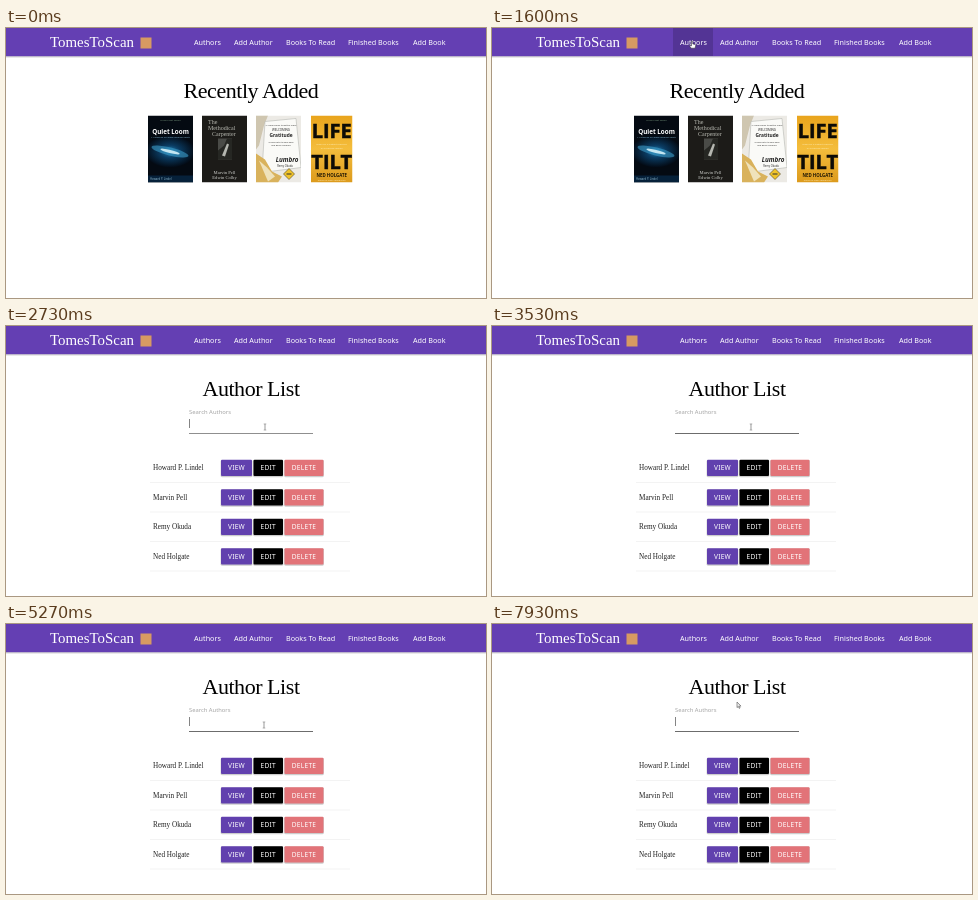
An HTML page that plays this animation: 480 px wide and 270 px high, repeating every 8 s.

```html
<!DOCTYPE html>
<html lang="en">
<head>
<meta charset="utf-8">
<title>Reading list</title>
<style>
  html, body { margin: 0; width: 100%; height: 100%; overflow: hidden; background: #fff; }
  #stage { display: block; width: 480px; height: 270px; }
  text { font-family: "Noto Sans", sans-serif; }
  .display { font-family: "Liberation Serif", "Times New Roman", serif; }
  .title { font-size: 22px; letter-spacing: -.45px; text-anchor: middle; }
  .brand { font-size: 14.9px; fill: #fff; }
  .nav { font-size: 7.2px; fill: #fff; }
  .name { font-size: 7.2px; fill: #222; }
  .btn { font-size: 6.6px; letter-spacing: .25px; fill: #fff; text-anchor: middle; }
  .sans { font-family: "Open Sans", sans-serif; }
  .mid { text-anchor: middle; }
  .bold { font-weight: 700; }
</style>
</head>
<body>
<svg id="stage" viewBox="0 0 480 270">
  <defs>
    <linearGradient id="shade" x2="0" y2="1">
      <stop stop-color="#000" stop-opacity=".22"/>
      <stop offset="1" stop-color="#000" stop-opacity="0"/>
    </linearGradient>
    <radialGradient id="glow">
      <stop stop-color="#1d7fb4"/>
      <stop offset=".4" stop-color="#0a3a60"/>
      <stop offset="1" stop-color="#030a14"/>
    </radialGradient>
    <linearGradient id="gold" x2="0" y2="1">
      <stop stop-color="#e9a41c"/>
      <stop offset=".5" stop-color="#f4bd3c"/>
      <stop offset="1" stop-color="#dc9a1c"/>
    </linearGradient>
  </defs>

  <rect y="28" width="480" height="2.5" fill="url(#shade)"/>
  <rect width="480" height="28.2" fill="#643fb3"/>
  <rect id="hover" x="181" width="40" height="28" fill="#000" opacity=".17"/>
  <text class="display brand" x="44" y="19">TomesToScan</text>
  <rect x="134.5" y="9.5" width="11" height="11" fill="#d79a62"/>
  <g id="menu"></g>

  <g id="home">
    <text class="display title" x="245" y="70">Recently Added</text>
    <g id="covers">
      <svg x="142" y="87.5" width="45" height="67" viewBox="0 0 45 67">
        <rect width="45" height="67" fill="#040a12"/>
        <ellipse cx="22" cy="36" rx="25" ry="16" fill="url(#glow)"/>
        <g transform="rotate(14 22 36)">
          <ellipse cx="22" cy="36" rx="19" ry="4" fill="#3c9dca" opacity=".6"/>
          <ellipse cx="22" cy="36" rx="10" ry="1.6" fill="#c4e6f2"/>
        </g>
        <text class="sans mid" x="22.5" y="5.5" font-size="2.5" fill="#86a98b">Hollis Craft Series</text>
        <text class="sans mid bold" x="22.5" y="18" font-size="6.3" fill="#fff">Quiet Loom</text>
        <text class="sans mid" x="22.5" y="22.5" font-size="2.2" fill="#8fc7e2">A Notebook of Careful Weaving Habits</text>
        <rect y="60" width="45" height="7" fill="#06213a"/>
        <text class="sans" x="2" y="64.5" font-size="2.8" fill="#91bcd0">Howard P. Lindel</text>
      </svg>

      <svg x="196" y="87.5" width="45" height="67" viewBox="0 0 45 67">
        <rect width="45" height="67" fill="#1c1b18"/>
        <g fill="#b9bab2" font-size="6">
          <text class="display" x="6" y="8">The</text>
          <text class="display" x="6" y="14">Methodical</text>
          <text class="display" x="10" y="20">Carpenter</text>
        </g>
        <rect x="16" y="23" width="14" height="21" fill="#4a4b47"/>
        <path d="M16 44V35l6-5 3-7h5v21z" fill="#262723"/>
        <path d="M20 40l5-12 2 1-4 12z" fill="#b5b7b0"/>
        <g class="mid" fill="#d0d2ce" font-size="4.6">
          <text class="display" x="22.5" y="58.5">Marvin Pell</text>
          <text class="display" x="22.5" y="63.5">Edwin Colby</text>
        </g>
      </svg>

      <svg x="250" y="87.5" width="45" height="67" viewBox="0 0 45 67">
        <rect width="45" height="67" fill="#eceae5"/>
        <path d="M0 0h12L8 10 3 30 0 34z" fill="#cfc6b0"/>
        <path d="M9 6l31-3 5 49-39 5z" fill="#fafaf7" stroke="#b5b7b3" stroke-width=".6"/>
        <path d="M0 38l9 6 7 12 10 5-4 6H0z" fill="#d9b25c"/>
        <path d="M3 45l8 7 8 9-7 5z" fill="#efe2bb"/>
        <g class="mid" fill="#222">
          <text class="sans" x="25" y="10" font-size="2.4">A Small Road to Better Days</text>
          <text class="sans" x="25" y="15" font-size="3">WELCOMING</text>
          <text class="sans bold" x="25" y="21.5" font-size="4.8">Gratitude</text>
          <text class="sans" x="25" y="27" font-size="2.2">a calm path to daily ease</text>
          <text class="sans" x="25" y="30.5" font-size="2.2">and good company</text>
          <text class="sans bold" x="31" y="46" font-size="6.3" font-style="italic">Lumbro</text>
          <text class="sans" x="29" y="51" font-size="2.6">Remy Okuda</text>
        </g>
        <path d="M33 53l5.5 5.5-5.5 5.5-5.5-5.5z" fill="#f0c329" stroke="#4a4020" stroke-width=".6"/>
        <path d="M30.5 58.5h5" stroke="#333" stroke-width="1.2"/>
      </svg>

      <svg x="305" y="87.5" width="41.5" height="67" viewBox="0 0 41.5 67">
        <rect width="41.5" height="67" fill="url(#gold)"/>
        <g class="mid bold" font-size="20" stroke="#0d0b06" stroke-width=".5" fill="#0d0b06">
          <text class="sans" x="20.7" y="22">LIFE</text>
          <text class="sans" x="20.7" y="53.5">TILT</text>
        </g>
        <text class="sans mid" x="20.7" y="29" font-size="2.4" fill="#fff3c8">Rules for a Patient Harbour</text>
        <text class="sans mid" x="20.7" y="33" font-size="2.4" fill="#fff3c8">in a Hurried Season</text>
        <text class="sans mid bold" x="20.7" y="61" font-size="4.4" fill="#231905">NED HOLGATE</text>
        <text class="sans mid" x="20.7" y="65" font-size="2.2" fill="#fff3c8">author of Plain Sailing Days</text>
      </svg>
    </g>
  </g>

  <g id="list">
    <text class="display title" x="245" y="70">Author List</text>
    <g id="label"><text font-size="7.25" fill="#a4a4a4">Search Authors</text></g>
    <rect id="line" x="183" y="107" width="124"/>
    <rect id="caret" x="183" y="93" width=".8" height="9" fill="#666"/>
    <g id="rows"></g>
  </g>

  <g id="cursor">
    <path id="arrow" d="M0 0v5.6l1.3-1.2.9 2 .9-.4-.9-1.9h1.8z" fill="#eee" stroke="#555" stroke-width=".6"/>
    <path id="hand" d="M-.6.4q.7-.8 1.3 0v2.5l2.5.6q.6.2.5.9l-.6 2.8H-.8l-1.7-2.4q.3-1 1.9.1z" fill="#fff" stroke="#222" stroke-width=".5"/>
    <path id="beam" d="M-1.2-3q1 0 1.2.5.2-.5 1.2-.5M0-2.5v5M-1.2 3q1 0 1.2-.5.2.5 1.2.5" fill="none" stroke="#555" stroke-width=".6"/>
  </g>
</svg>

<script>
const LOOP = 8000, TICK = 1000 / 15;
const PAGE_SWITCH = 1800, FOCUS = 2600;
const $ = id => document.getElementById(id);

const links = [[188, "Authors"], [228, "Add Author"], [280, "Books To Read"],
  [342, "Finished Books"], [407, "Add Book"]];
const authors = ["Howard P. Lindel", "Marvin Pell", "Remy Okuda", "Ned Holgate"];
const buttons = [["VIEW", 215, 31, "#6140ae"], ["EDIT", 247.5, 29.5, "#000"],
  ["DELETE", 278.5, 39, "#e27378"]];

$("menu").innerHTML = links.map(([x, s]) => `<text class="nav" x="${x}" y="17">${s}</text>`).join("");

const button = ([s, x, w, color]) => `
  <rect x="${x - .4}" y=".3" width="${w + .8}" height="17.2" rx="1.4" fill="#000" opacity=".2"/>
  <rect x="${x}" width="${w}" height="16.4" rx="1" fill="${color}"/>
  <text class="btn" x="${x + w / 2}" y="10.6">${s}</text>`;

$("rows").innerHTML = authors.map((name, i) => `
  <g transform="translate(0 ${133.7 + i * 29.5})">
    <text class="display name" x="147" y="10.5">${name}</text>
    ${buttons.map(button).join("")}
    <rect x="144" y="22.5" width="200" height=".6" fill="#ebebeb"/>
  </g>`).join("");

// time, x, y
const path = [[70, 236, 238], [300, 232, 190], [600, 212, 80], [866, 202.6, 28.5],
  [930, 201, 20], [1070, 200, 13], [1800, 200, 13], [1930, 204, 24],
  [2330, 246, 84], [2530, 259, 101], [3530, 259, 101], [3800, 258, 101],
  [7800, 258, 101], [7866, 251, 93], [7933, 245, 78]];

// the caret flips at each of these
const blinks = [2600, 3200, 4266, 4733, 5200, 5666, 6133, 6266, 6800, 7333, 7866];

function pointAt(t) {
  const i = path.findIndex(p => p[0] > t);
  if (i < 0) return path[path.length - 1].slice(1);
  if (i === 0) return path[0].slice(1);
  const [t0, x0, y0] = path[i - 1], [t1, x1, y1] = path[i];
  const k = (t - t0) / (t1 - t0);
  return [x0 + (x1 - x0) * k, y0 + (y1 - y0) * k];
}

function show(id, on) {
  $(id).style.display = on ? "" : "none";
}

function draw(time) {
  const t = Math.floor((time + 4) / TICK) * TICK + .7;
  const onList = t >= PAGE_SWITCH;
  show("home", !onList);
  show("list", onList);

  const [x, y] = pointAt(t);
  const overLink = t > 70 && x > 181 && x < 221 && y < 27;
  const overInput = onList && x > 183 && x < 307 && y > 90 && y < 108;
  show("cursor", t > 66);
  show("hover", overLink);
  show("hand", overLink);
  show("beam", overInput);
  show("arrow", !overLink && !overInput);
  $("cursor").setAttribute("transform", `translate(${x} ${y})`);

  const p = Math.min(1, Math.max(0, (t - FOCUS) / 220));
  const lift = 1 - (1 - p) ** 3;
  $("label").setAttribute("transform",
    `translate(183 ${100.6 - 13.1 * lift}) scale(${1 - .2 * lift})`);
  const gray = 158 - 50 * p;
  $("line").setAttribute("height", .7 + .3 * p);
  $("line").setAttribute("fill", `rgb(${gray} ${gray} ${gray})`);
  show("caret", blinks.filter(b => b <= t).length % 2 === 1);
}

const start = performance.now();
function frame() {
  draw((performance.now() - start) % LOOP);
  requestAnimationFrame(frame);
}
frame();
</script>
</body>
</html>
```
